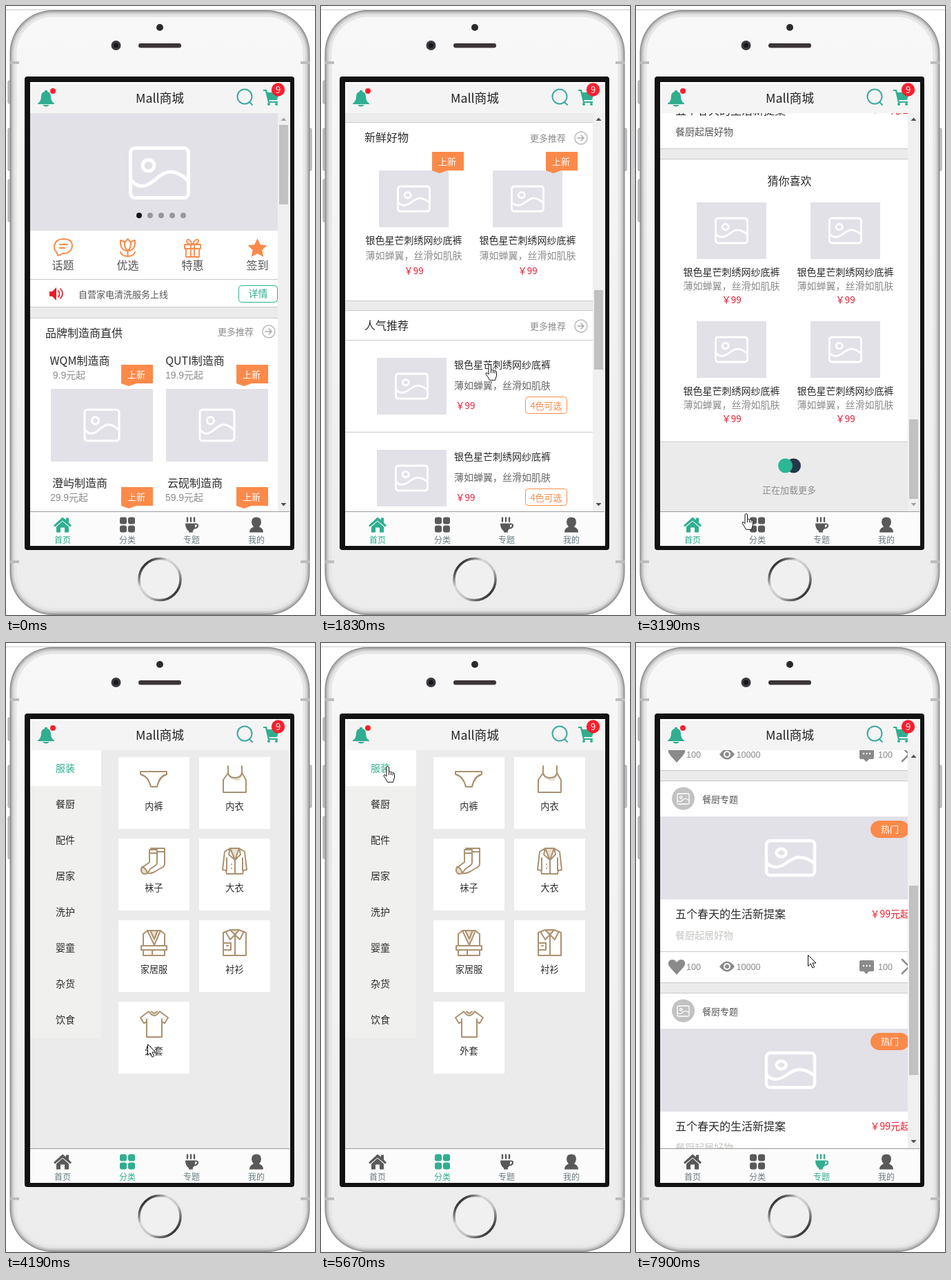
Recreate the animation shown at these times as an HTML page. Size 448x881 px, loop 8 s.

```html
<!DOCTYPE html>
<html lang="zh-CN">
<head>
<meta charset="utf-8">
<title>Mall</title>
<style>
html, body { margin: 0; width: 100%; height: 100%; overflow: hidden; background: #fff; }
svg { display: block; width: 100vw; height: 100vh; }
text { font-family: "Noto Sans CJK SC", "Noto Sans CJK", sans-serif; white-space: pre; }
text.n { font-family: "Liberation Sans", "Noto Sans CJK SC", "Noto Sans CJK", sans-serif; }
.line { fill: none; stroke-linecap: round; stroke-linejoin: round; }
</style>
</head>
<body>
<svg id="stage" viewBox="0 0 448 881" xmlns="http://www.w3.org/2000/svg"></svg>
<script>
const TEAL = '#2fae90', ORANGE = '#fb8a4a', RED = '#e51a32', GREY = '#8c8c8c', INK = '#2b2b2b';
const LINE = '#c9c9c9', GAP = '#ebebeb', PALE = '#e2e1e8';

const rect = (x, y, w, h, fill, more = '') =>
  `<rect x="${x}" y="${y}" width="${w}" height="${h}" fill="${fill}" ${more}/>`;
const disc = (x, y, r, fill, more = '') => `<circle cx="${x}" cy="${y}" r="${r}" fill="${fill}" ${more}/>`;
const path = (d, fill, more = '') => `<path d="${d}" fill="${fill}" ${more}/>`;
const line = (d, color, w = 2, more = '') =>
  `<path class="line" d="${d}" stroke="${color}" stroke-width="${w}" ${more}/>`;
const at = (x, y, body, more = '') => `<g transform="translate(${x} ${y})" ${more}>${body}</g>`;
// y is the vertical middle of the text
const text = (x, y, s, size, fill, anchor = 'start', more = '') =>
  `<text x="${x}" y="${y + size * .37}" font-size="${size}" fill="${fill}" text-anchor="${anchor}" ${more}>${s}</text>`;
const mid = (x, y, s, size, fill, more) => text(x, y, s, size, fill, 'middle', more);
const rule = y => rect(35, y, 359, 1, LINE);
const gap = (y, h) => rect(35, y, 359, h, GAP) + rule(y) + rule(y + h - 1);

function picture(cx, cy, w, h, sw) {
  const x = cx - w / 2, y = cy - h / 2, p = (u, v) => `${x + u * w} ${y + v * h}`;
  return rect(x, y, w, h, 'none', `rx="${sw * 1.3}" stroke="#fff" stroke-width="${sw}"`) +
    `<ellipse cx="${x + w * .31}" cy="${y + h * .35}" rx="${w * .1}" ry="${h * .115}" fill="none" stroke="#fff" stroke-width="${sw}"/>` +
    line(`M${p(.02, .66)}C${p(.16, .84)} ${p(.3, .76)} ${p(.43, .63)}S${p(.72, .36)} ${p(.98, .64)}`, '#fff', sw);
}
const photo = (x, y, w, h, pw, ph, sw) => rect(x, y, w, h, PALE) + picture(x + w / 2, y + h / 2, pw, ph, sw);
const thumbnail = (x, y) => photo(x, y, 101, 82, 46, 36, 2.8);
const ribbon = (x, y) => path(`M${x} ${y}h46v27h-24l-11 4-11-4z`, ORANGE) + mid(x + 22, y + 14, '上新', 13, '#fff', 'font-weight="500"');
const more = (x, y) => text(x, y, '更多推荐', 13, GREY) + disc(x + 74, y, 9, 'none', 'stroke="#bbb" stroke-width="1.5"') +
  line(`M${x + 69} ${y}h9m-4-4l4 4-4 4`, '#aaa', 1.5);
const heading = (y, s) => text(63, y, s, 16, INK) + more(303, y + 1);

const NAME = '银色星芒刺绣网纱底裤', DESC = '薄如蝉翼，丝滑如肌肤';

function goods(x, y, rows) {
  const c = x + 50.5;
  return thumbnail(x, y) + rows.map(([dy, s, size, color]) => mid(c, y + dy, s, size, color)).join('');
}
const pair = (x, y, rows, extra = () => '') =>
  [x, x + 165].map(px => goods(px, y, rows) + extra(px, y)).join('');

function brand(x, y, name, price) {
  return mid(x + 42, y, name, 16, INK) + mid(x + 26.5, y + 21, price, 14, GREY, 'class="n"') +
    ribbon(x + 102, y + 6) + photo(x, y + 41, 148, 105, 50, 45, 3);
}

function popular(y) {
  return thumbnail(81, y + 26) + text(193, y + 36, NAME, 14, INK) + text(193, y + 66, DESC, 14, '#666') +
    text(195, y + 95, '￥99', 13.5, RED) +
    rect(296.5, y + 82.5, 60, 24, 'none', `rx="4" stroke="${ORANGE}"`) + mid(326.5, y + 95, '4色可选', 13, ORANGE) + rule(y + 133);
}

function homePage() {
  const sale = [[101, '秒杀价￥99', 14, RED], [121, NAME, 14, INK], [141, DESC, 14, GREY]];
  const plain = [[101, NAME, 14, INK], [121, DESC, 14, GREY], [141, '￥99', 13.5, RED]];
  const fresh = [[101, NAME, 14, INK], [123, DESC, 14, GREY], [145, '￥99', 13.5, RED]];
  const badge = (x, y) => disc(x + 105, y - 6, 20.5, '#f8001f') + mid(x + 104, y - 6, '￥299', 13.5, '#fff');
  const nav = ['话题', '优选', '特惠', '签到'].map((s, i) => mid(82.5 + 94 * i, 375, s, 16, '#555')).join('');
  const icons =
    line('M75 361l-1-4Q69 353 70 347Q72 337 83 337Q96 337 96 347Q95 358 82 358Q78 361 75 361zM78 345h11M78 350h7', ORANGE) +
    line('M166 339q4 0 6 3l4.500-5 4.500 5q2-3 6-3q1 15-10.500 15T166 339M172 342q-1 7 4.500 12q5.500-5 4.500-12M176.500 354v8M176 362q-8 0-10-6M177 362q8 0 10-6', ORANGE) +
    line('M259 345h23v6h-23zM261 351h19v12h-19zM268 345v18M273 345v18M270 345q-9-1-8-6q4-4 8 6q5-10 9-6q1 5-9 6', ORANGE, 1.8) +
    path('M364.500 336l4.300 9.200 9.700 1-7.200 6.900 2 9.900-8.800-4.900-8.800 4.900 2-9.900-7.200-6.900 9.700-1z', ORANGE);
  const timer = [289.5, 329.5, 369.5].map((x, i) => rect(x - 15.5, 913, 31, 21, '#000', 'rx="4"') +
    mid(x, 923.5, ['00', '20', '<tspan id="sec">56</tspan>'][i], 12.5, '#fff', 'class="n" font-weight="bold"')).join('') +
    mid(309.5, 922, ':', 14, '#000', 'font-weight="bold"') + mid(349.5, 922, ':', 14, '#000', 'font-weight="bold"');
  return rect(35, 155, 359, 2710, '#fff') +
    rect(35, 155, 376, 170, PALE) + picture(222.5, 241.5, 84, 72, 5) +
    [0, 1, 2, 3, 4].map(i => disc(193 + 16 * i, 303, 4, i ? '#97979c' : '#111')).join('') +
    icons + nav + rule(395) +
    path('M63 413h4l6-6v19l-6-6h-4z', '#ee1c25') + line('M76 412q3 4 0 9M79 409q6 7 0 14', '#e0303a', 1.8) +
    text(105, 417, '自营家电清洗服务上线', 13, '#555') +
    rect(337.5, 404.5, 56, 24, '#fff', `rx="4" stroke="${TEAL}"`) + mid(365.5, 416, '详情', 14, TEAL) +
    gap(435, 17) + text(57, 473, '品牌制造商直供', 16, INK) + more(307, 471) +
    brand(65, 513, 'WQM制造商', '9.9元起') + brand(232, 513, 'QUTI制造商', '19.9元起') +
    brand(65, 690, '澄屿制造商', '29.9元起') + brand(232, 690, '云砚制造商', '59.9元起') +
    gap(868, 16) + text(65, 904, '秒杀专区', 16, INK) + text(65, 924, '下一场18：00开始', 13, '#555', 'start', 'class="n"') +
    text(288, 900, '本场结束剩余', 13, GREY) + timer +
    pair(88, 980, sale, badge) + pair(88, 1152, sale, badge) +
    gap(1351, 15) + heading(1387, '新鲜好物') +
    pair(84, 1435, fresh, (x, y) => ribbon(x + 77, y - 27)) +
    gap(1623, 15) + heading(1659, '人气推荐') + rule(1680) + [1680, 1813, 1946].map(popular).join('') +
    gap(2079, 16) + heading(2115, '专题精选') + photo(35, 2137, 376, 130, 70, 50, 4.5) +
    text(57, 2285, '五个春天的生活新提案', 16, INK) + text(339.5, 2284, '￥99元起', 14, '#f01c2c') +
    text(57, 2316, '餐厨起居好物', 14, '#555') +
    gap(2340, 16) + mid(222.5, 2387, '猜你喜欢', 16, INK) + pair(88, 2418, plain) + pair(88, 2590, plain) +
    rect(35, 2764, 359, 101, GAP) + rule(2764) +
    disc(228, 2799, 10.5, '#26374a', 'id="dark"') + disc(216, 2799, 10.5, '#2cb795', 'id="light"') +
    mid(222, 2834, '正在加载更多', 13, GREY);
}

const BEIGE = '#e9dfd0';
const ICONS = {
  内裤: 'M1 9h38v4Q28 17 25 31h-9Q13 17 1 13zM1 13q11 2 15 18M39 13q-11 2-14 18',
  内衣: 'M11 1v10L4 21v18h33V21l-6-10V1M11 11q1 7 10 7t10-7',
  袜子: 'M14 4h11v18q0 4-4 6l-6 4-4 6q-7 3-9-3q-1-5 4-7l8-6zM14 9h11M3 29q6 1 8 9M16 2h20v22q0 4-4 6l-9 5q-5 4-12 3M25 7h11',
  大衣: 'M14 2h13l8 5 3 26-5 1-1 5H9l-1-5-5-1 3-26zM14 2l-2 9 9 8 8-8-2-9M14 2l7 17 6-17M9 34V16M32 34V16M21 19v20M16 25h.1M16 31h.1',
  家居服: 'M11 3L5 8v17M30 3l6 5v17M11 3h19M11 3l10 21L30 3M5 31v8h31v-8M2 25h37v6H2zM15 3l6 12 5-12M18 31v8',
  衬衫: 'M14 2L4 6v33h33V6L27 2zM14 2l7 7-7 7-6-10M27 2l-6 7 7 7 5-10M21 9v30M4 21h11v10H4M9 25h2',
  外套: 'M13 2L1 11l5 8 4-2v22h22V17l4 2 5-8-12-9q-8 12-16 0zM10 17v-4M32 17v-4M17 2q4 5 8 0',
  锅具: 'M4 12h33v25H4zM1 15v-3h39v3M4 12q1-4 5-4h23q4 0 5 4M20 8V4M18 4h5',
  刀铲: 'M11 1h19v13l-5 5h-9l-5-5zM16 6v5M20.500 6v5M25 6v5M20.500 19v5M18 24h5v13q-2.500 3-5 0z',
  功能厨具: 'M15 1h11q7 2 7 9-1 9-8 10v14q-1 5-4.500 5t-4.500-5V20q-7-1-8-10 0-7 7-9zM13 7q2-3 5 0q3-3 5 0q4-3 6 2q0 5-4 4h-10q-4-2-2-6',
  餐具: 'M7 1v9q0 4 4.500 5q4.500-1 4.500-5V1M11.500 1v22M9 24h5v14H9zM30 1q6 1 6 8t-6 8q-6-1-6-8t6-8M30 17v7M27.500 24h5v14h-5z',
  杯壶: 'M4 1h10v10H4zM4 11L3 39h12l-1-28M18 17h15l-2 22H20zM33 20q7-2 5 5q-1 5-6 4M21 9v4M25 9v4M29 9v4'
};
const SHADE = {
  内裤: 'M1 13q11 2 15 18Q13 17 1 13zM39 13q-11 2-14 18Q28 17 39 13z', 内衣: 'M11 11q1 7 10 7t10-7q-1 14-10 11t-10-11z',
  袜子: 'M3 29q6 1 8 9-8 3-9-3z', 大衣: 'M14 2h13l-6 17z', 家居服: 'M15 3l6 18 6-18z', 衬衫: 'M14 2h13l-6 7z',
  外套: 'M13 2q8 12 16 0h-4q-4 5-8 0z', 功能厨具: 'M13 7h15v6H13z', 杯壶: 'M4 1h10v10H4z'
};
function cards(list) {
  return list.map((s, i) => at(163 + 117 * (i % 2), 165 + 118 * (i >> 1),
    rect(0, 0, 103, 104, '#fff') + mid(51.5, 71, s, 13.2, INK) +
    at(31, 12, path(SHADE[s] || 'M0 0', BEIGE) + line(ICONS[s], '#ab9170', 2)))).join('');
}
function categoryPage(active) {
  const side = ['服装', '餐厨', '配件', '居家', '洗护', '婴童', '杂货', '饮食'].map((s, i) =>
    rect(35, 155 + 52 * i, 103, 52, i === active ? '#fff' : '#f0f0ee') +
    mid(86, 181 + 52 * i, s, 14, i === active ? TEAL : INK)).join('');
  return rect(35, 155, 375, 576, GAP) + side +
    cards(active ? ['锅具', '刀铲', '功能厨具', '餐具', '杯壶'] : ['内裤', '内衣', '袜子', '大衣', '家居服', '衬衫', '外套']);
}

function topicCard(y) {
  const c = '#8a8a8a';
  const stat = (x, s) => text(x, 269, s, 12.6, c, 'start', 'class="n"');
  return at(0, y, rect(35, 0, 359, 293, '#fff') + rule(0) +
    disc(68.5, 26, 16.5, '#c2c2c2') + picture(68.5, 26.5, 17, 15, 1.3) + text(96, 27, '餐厨专题', 13, '#555') +
    rect(35, 52, 376, 120, PALE) + picture(224, 112, 70, 50, 4.5) +
    rect(340, 58, 56, 25, ORANGE, 'rx="12.5"') + mid(368, 70.5, '热门', 13, '#fff') +
    text(57, 193, '五个春天的生活新提案', 16, INK) + text(339.5, 193, '￥99元起', 14, '#f01c2c') +
    text(57, 224, '餐厨起居好物', 14, '#c3c6c0') + rule(247) +
    path('M59 281L50 271Q44 264 49 260Q55 257 59 263Q63 257 69 260Q74 264 68 271z', c) + stat(73, '100') +
    path('M121 269q11-15 22 0q-11 15-22 0z', c) + disc(132, 269, 5, '#fff') + disc(132, 269, 3, c) + stat(145.5, '10000') +
    path('M326 260h17q2 0 2 2v12q0 2-2 2h-5l-4 4-4-4h-4q-2 0-2-2v-12q0-2 2-2z', c) +
    [330, 334.5, 339].map(x => disc(x, 268, 1.2, '#fff')).join('') + stat(351, '100') +
    line('M386 259l20 20M386 279l20-20', c, 2.5) + rule(292));
}
const topicPage = () => rect(35, 155, 359, 1140, GAP) + photo(35, 155, 376, 98, 70, 50, 4.5) + rule(253) +
  [268, 575, 882].map(topicCard).join('') + rule(1189) + mid(222, 1259, '正在加载更多', 13, GREY);

function phone() {
  const key = (x, y, h) => rect(x, y, 5, h, '#c4c6c9', 'rx="1.5" stroke="#8d8f92" stroke-width=".8"');
  const shell = (inset, fill) => rect(5.5 + inset, 6 + inset, 435 - 2 * inset, 875 - 2 * inset, fill, `rx="${62 - inset}"`);
  const notch = (x, y) => rect(x, y, 13, 4, '#bdbdbd');
  return `<defs>
    <linearGradient id="shell" x2="0" y2="1"><stop stop-color="#f8f8f8"/><stop offset="1" stop-color="#ececec"/></linearGradient>
    <linearGradient id="ring" x2="1" y2="1"><stop offset=".12" stop-color="#222"/><stop offset=".35" stop-color="#d8d8d8"/><stop offset=".6" stop-color="#c4c4c4"/><stop offset=".88" stop-color="#2c2c2c"/></linearGradient>
    <clipPath id="view"><rect x="35" y="155" width="376" height="576"/></clipPath>
    <clipPath id="list"><rect x="35" y="155" width="359" height="576"/></clipPath></defs>` +
    rect(0, 0, 448, 881, '#fff') + rect(0, 5, 448, 1, '#c8c8c8') +
    key(3, 108, 33) + key(3, 177, 61) + key(3, 251, 61) + key(438, 177, 61) +
    shell(0, '#8e8e8e') + shell(1.5, '#b4b4b4') + shell(3.5, '#d2d2d2') + shell(6, '#e6e6e6') + shell(10, 'url(#shell)') +
    notch(6, 80) + notch(427, 80) + notch(6, 802) + notch(427, 802) +
    disc(223, 31, 5, '#2d2a2c') + disc(159.5, 57, 7, '#3a3a40') + disc(159.5, 57, 3.5, '#17171d') +
    rect(192, 54, 62, 6.500, '#3b3537', 'rx="3.2"') +
    rect(27, 102, 391, 685, '#121212', 'rx="4"') + rect(35, 110, 377, 671, '#fff') +
    disc(223, 829.5, 30, '#f0f0f0', 'stroke="url(#ring)" stroke-width="3.5"');
}

function header() {
  return rect(36, 112, 375, 43, '#f4f4f4') + mid(223, 133, 'Mall商城', 17.8, '#222') +
    path('M46 141q5-3 5-10q0-6 5-7v-2h4v2q5 1 5 7q0 7 5 10v1h-24zM53 143h10q-5 5-10 0z', TEAL) + disc(68, 123, 4, '#fb1f2d') +
    disc(346, 131, 10.5, 'none', 'stroke="#3fa9a0" stroke-width="2"') + line('M353 139l4 4', '#3fa9a0', 2) +
    path('M373 121h5l1 4h17l-3 11h-12l1 2h12v2h-14l-4-17h-3z', TEAL) + disc(381, 142, 2, TEAL) + disc(392, 142, 2, TEAL) +
    disc(394.5, 121, 9.7, '#fb1f2d') + mid(394.5, 121, '9', 13, '#fff');
}

function tabs() {
  const c = 'currentColor';
  const cells = [[-11, -11], [1, -11], [-11, 1], [1, 1]].map(([x, y]) => rect(x, y, 10, 10, c, 'rx="3"')).join('');
  const icons = [
    path('M-13 1L0-11l5 4v-3h4v7l4 4-2 2L0-6-11 3zM-9 3L0-5l9 8v8h-6V4h-6v7h-6z', c),
    cells,
    path('M-9-2H6q5 0 4 4q-1 4-6 4q-2 3-3 3h-5q-5-3-5-11zM5 0v4q3-1 3-4zM-4 9h6v2h-6z', c) + line('M-6-10v5M-1-10v5M4-10v5', c, 2.4),
    path('M0-11q7 0 7 7q0 4-3 7q6 2 6 8h-20q0-6 6-8q-3-3-3-7q0-7 7-7z', c)
  ];
  return rect(36, 731, 375, 50, '#fbfbfb') + rect(35, 731, 376, 1, '#9c9c9c') +
    ['首页', '分类', '专题', '我的'].map((s, i) => at([82, 176, 269, 363][i], 750.5,
      `<g class="icon">${icons[i]}</g>` + mid(0, 22.5, s, 12, 'currentColor'), 'class="tab"')).join('');
}

const scrollbar = rect(394, 155, 17, 576, '#f0f0f0') + rect(396, 172, 13, 115, '#c1c1c1', 'id="thumb"') +
  path('M398.500 166l4-4.500 4 4.500z', '#505050', 'id="up"') + path('M398.500 719l4 4.500 4-4.500z', '#505050', 'id="down"');
const cursors =
  `<g id="arrow">${path('M.5.5v16l3.800-3.500 2.600 6 2.700-1.200-2.600-5.800h5z', '#fff', 'stroke="#111"')}</g>` +
  `<g id="hand">${path('M5 1.500q2-2 3.500 0v7q2-1 3 .5q2-1 2.500.8q2.500-.5 2.500 2v5q-1 3-2 6.500h-8q-2-4-5.500-9q0-2.500 2-1.500l2 2zM8.500 9v4M11.500 9.500v3.500M14 10.500v3', '#fff', 'stroke="#111"')}</g>`;

document.getElementById('stage').innerHTML = phone() +
  `<g clip-path="url(#view)"><g clip-path="url(#list)"><g id="home">${homePage()}</g><g id="topics">${topicPage()}</g></g>` +
  `<g id="wear">${categoryPage(0)}</g><g id="kitchen">${categoryPage(1)}</g><g id="bar">${scrollbar}</g></g>` +
  header() + tabs() + cursors;

const $ = id => document.getElementById(id);
const show = (el, on) => el.setAttribute('display', on ? 'inline' : 'none');
const set = (id, name, v) => $(id).setAttribute(name, v);

// time, page, scroll, pointer, x, y
const STEPS = [
  [0, 'home', 0, '', 0, 0], [590, 'home', 0, 'arrow', 250, 798], [840, 'home', 0, 'arrow', 254, 600],
  [1090, 'home', 130, 'arrow', 252, 523], [1340, 'home', 390, 'arrow', 252, 523], [1580, 'home', 790, 'arrow', 246, 520],
  [1830, 'home', 1197, 'hand', 238, 518], [2080, 'home', 1480, 'hand', 238, 518], [2450, 'home', 1640, 'hand', 238, 518],
  [2700, 'home', 1960, 'arrow', 238, 518], [2940, 'home', 2134, 'arrow', 210, 620], [3190, 'home', 2134, 'hand', 153, 734],
  [3440, 'home', 2134, 'hand', 166, 779], [3690, 'wear', 0, 'hand', 168, 765], [3940, 'wear', 0, 'hand', 172, 750],
  [4190, 'wear', 0, 'arrow', 205, 580], [4440, 'wear', 0, 'arrow', 235, 430], [4690, 'wear', 0, 'arrow', 241, 389],
  [4930, 'wear', 0, 'arrow', 190, 260], [5180, 'wear', 0, 'arrow', 120, 123], [5430, 'wear', 0, 'hand', 90, 178],
  [5680, 'kitchen', 0, 'hand', 86, 224], [5930, 'kitchen', 0, 'hand', 92, 232], [6160, 'kitchen', 0, 'arrow', 175, 390],
  [6410, 'kitchen', 0, 'arrow', 235, 570], [6660, 'kitchen', 0, 'hand', 260, 777], [6910, 'kitchen', 0, 'hand', 257, 756],
  [7160, 'topics', 0, 'hand', 257, 756], [7400, 'topics', 0, 'arrow', 250, 500], [7650, 'topics', 190, 'arrow', 249, 451],
  [7900, 'topics', 376, 'arrow', 249, 451]
];
const TAB = { home: 0, wear: 1, kitchen: 1, topics: 2 };
const BAR = { home: [115, 2134], topics: [274, 561] };

function draw(t) {
  const [time, page, scroll, pointer, x, y] = STEPS.findLast(s => s[0] <= t);
  for (const id in TAB) show($(id), id === page);
  show($('bar'), page in BAR);
  if (page in BAR) {
    const [size, max] = BAR[page];
    set(page, 'transform', `translate(0 ${-scroll})`);
    set('thumb', 'height', size);
    set('thumb', 'y', 172 + (541 - size) * scroll / max);
    set('up', 'fill', scroll ? '#505050' : '#a3a3a3');
    set('down', 'fill', scroll < max ? '#505050' : '#a3a3a3');
  }
  document.querySelectorAll('.tab').forEach((el, i) => {
    const on = i === TAB[page];
    el.setAttribute('color', on ? TEAL : '#6b7b80');
    el.firstChild.setAttribute('color', on ? TEAL : '#595959');
  });
  for (const id of ['arrow', 'hand']) {
    show($(id), id === pointer);
    set(id, 'transform', `translate(${x} ${y})`);
  }
  $('sec').textContent = 57 - Math.floor(time / 1000);
  const sway = 12 * Math.cos((time - 3190) / 1000 * 2 * Math.PI + Math.PI / 3);
  set('light', 'cx', 222.5 - sway);
  set('dark', 'cx', 222.5 + sway);
}

const start = performance.now();
function tick() {
  draw((performance.now() - start) % 8000);
  requestAnimationFrame(tick);
}
tick();
</script>
</body>
</html>
```
